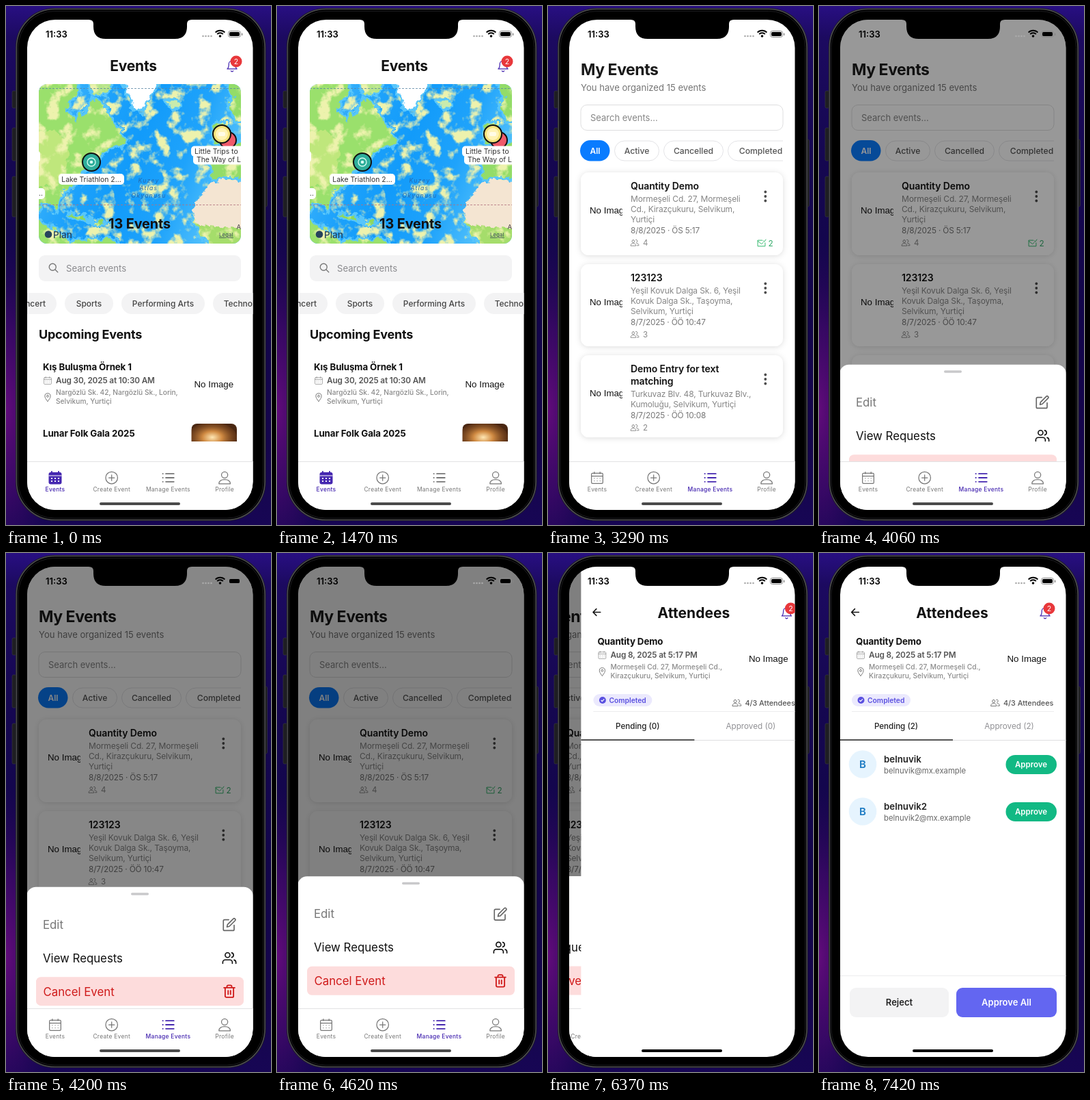
An HTML page that plays this animation: 388 by 758 pixels, repeating every 8000 ms.

```html
<!DOCTYPE html>
<html lang="en">
<head>
<meta charset="utf-8">
<title>Events app</title>
<style>
html, body { margin: 0; width: 100%; height: 100%; overflow: hidden; background: #140752; }
svg { display: block; width: 100%; height: 100%; }
text { font-family: Inter, "Noto Sans", sans-serif; white-space: pre; }
.plain { font-family: "Liberation Sans", Arial, sans-serif; }
.shore { stroke: #58c6fb; stroke-width: 7; paint-order: stroke; }
</style>
</head>
<body>
<svg id="stage" viewBox="0 0 388 758"></svg>
<script>
const LOOP = 8000, STEP = 70, SCREEN_W = 332, SHEET_H = 264;
const INDIGO = '#4527b0', GREY = '#777';

const text = (x, y, size, str, o = {}) =>
  `<text x="${x}" y="${y}" font-size="${size}" font-weight="${o.w || 400}" fill="${o.c || '#111'}"` +
  ` text-anchor="${o.a || 'start'}" letter-spacing="${o.ls || 0}" ${o.x || ''}>${str}</text>`;
const mid = (x, y, size, str, o = {}) => text(x, y, size, str, { ...o, a: 'middle' });
const rect = (x, y, w, h, r, fill, extra = '') =>
  `<rect x="${x}" y="${y}" width="${w}" height="${h}" rx="${r}" fill="${fill}" ${extra}/>`;
const circle = (x, y, r, fill, extra = '') =>
  `<circle cx="${x}" cy="${y}" r="${r}" fill="${fill}" ${extra}/>`;
const line = (x1, x2, y, color, extra = '') =>
  `<path d="M${x1} ${y}H${x2}" stroke="${color}" ${extra}/>`;

// Icons live in a 24 x 24 box.
const ICONS = {
  calendar: 'M4 4h16a2 2 0 0 1 2 2v14a2 2 0 0 1-2 2H4a2 2 0 0 1-2-2V6a2 2 0 0 1 2-2zM2 9h20M7 2v3M17 2v3M7 13h.1M12 13h.1M17 13h.1M7 17.5h.1M12 17.5h.1M17 17.5h.1',
  plus: 'M12 1.5a10.5 10.5 0 1 0 0 21 10.5 10.5 0 0 0 0-21M12 7v10M7 12h10',
  list: 'M8 5h14M8 12h14M8 19h14M2.5 5h.4M2.5 12h.4M2.5 19h.4',
  person: 'M12 1.5a5.5 5.5 0 1 0 0 11 5.5 5.5 0 0 0 0-11M2 22.5c0-5 4.5-7.5 10-7.5s10 2.5 10 7.5z',
  pin: 'M12 22s7-7 7-13a7 7 0 0 0-14 0c0 6 7 13 7 13zM12 6.5a2.5 2.5 0 1 0 0 5 2.5 2.5 0 0 0 0-5',
  bell: 'M18 8a6 6 0 0 0-12 0c0 7-3 9-3 9h18s-3-2-3-9M14 20.5a2.2 2.2 0 0 1-4 0',
  edit: 'M11 4H4a2 2 0 0 0-2 2v14a2 2 0 0 0 2 2h14a2 2 0 0 0 2-2v-7M18.5 2.5a2.12 2.12 0 0 1 3 3L12 15l-4 1 1-4z',
  users: 'M17 21v-2a4 4 0 0 0-4-4H5a4 4 0 0 0-4 4v2M23 21v-2a4 4 0 0 0-3-3.87M16 3.13a4 4 0 0 1 0 7.75M9 3a4 4 0 1 0 0 8 4 4 0 0 0 0-8',
  trash: 'M3 6h18M19 6v14a2 2 0 0 1-2 2H7a2 2 0 0 1-2-2V6M8 6V4a2 2 0 0 1 2-2h4a2 2 0 0 1 2 2v2M10 11v6M14 11v6',
  group: 'M8 5a3.5 3.5 0 1 0 0 7 3.5 3.5 0 0 0 0-7M1 20c0-4 3-6 7-6s7 2 7 6zM15 4.5a3.5 3.5 0 1 1 1.5 7M17 14c4 0 6 2 6 6h-5',
  mail: 'M14 4H2v16h20V11M2 6l10 8 5-4M17 5l2.5 3L24 2',
  search: 'M10 2a8 8 0 1 0 0 16 8 8 0 0 0 0-16M16 16l6 6',
  back: 'M22 12H3M11 3l-9 9 9 9'
};
const icon = (name, x, y, size, color, width = 1.6) =>
  `<path d="${ICONS[name]}" transform="translate(${x - size / 2} ${y - size / 2}) scale(${size / 24})" fill="none"` +
  ` stroke="${color}" stroke-width="${width}" stroke-linecap="round" stroke-linejoin="round"/>`;

const noImage = (x, y) => text(x, y, 13.3, 'No Image', { x: 'class="plain"' });

const bell = () => icon('bell', 331, 88, 19, INDIGO, 1.6) + circle(337, 81, 8.5, '#e8383b') +
  mid(337, 85, 10.5, '2', { c: '#fff' });

function tabBar(active) {
  const tabs = [['calendar', 'Events'], ['plus', 'Create Event'], ['list', 'Manage Events'], ['person', 'Profile']];
  return rect(30, 665, 332, 74, 0, '#fff') + line(30, 362, 665.5, '#e2e2e4') + tabs.map(([name, label], i) => {
    const x = 72 + i * 82.7, color = i === active ? INDIGO : GREY;
    const full = i === active && name === 'calendar';
    const mark = full
      ? rect(x - 9.5, 681, 19, 17.5, 3, color) + rect(x - 6, 679, 2, 4, 1, color) + rect(x + 4, 679, 2, 4, 1, color) +
        line(x - 9.5, x + 9.5, 686, '#fff') +
        [0, 1, 2, 3, 4, 5].map(k => rect(x - 6 + (k % 3) * 5, k < 3 ? 689 : 693, 2, 2, .4, '#fff')).join('')
      : icon(name, x, 689, 20, color, name === 'list' ? 2.2 : 1.5);
    return mark + mid(x, 709, 8.5, label, { c: color, ls: .25, w: i === active ? 500 : 400 });
  }).join('');
}

function eventInfo(dy, title, date, street, city) {
  return `<g transform="translate(0 ${dy})">` +
    text(54, 134, 13.3, title, { w: 700, ls: -.1 }) +
    icon('calendar', 61, 149, 13, '#888', 1.3) +
    text(73, 153, 11.8, date, { w: 600, c: '#555', ls: -.15 }) +
    icon('pin', 61, 173.5, 14, '#777', 1.7) +
    text(73, 170, 10.2, street, { w: 500, c: '#8a8a8a' }) +
    text(73, 182.5, 10.2, city, { w: 500, c: '#8a8a8a' }) +
    noImage(275.5, 159) + '</g>';
}

function map() {
  const tag = (x, y, w, str) => rect(x, y, w, 15.5, 5, '#fff') + text(x + 5, y + 11.5, 10.4, str, { c: '#333' });
  const sea = (y, str) => mid(209, y, 8.5, str, { c: '#2468ae', ls: 1.3, x: 'font-style="italic"' });
  return `<g clip-path="url(#mapClip)">` + rect(48, 114, 296, 233, 0, 'url(#ocean)') +
    `<g filter="url(#land)">
      <path class="shore" d="M40 106H104L106 128 90 142 86 154 98 160 104 172 110 158 122 150 126 134 142 144 152 162 168 182 174 202 152 206 140 219 126 228 112 240 102 254 95 264 84 272 77 284 74 300 64 288 50 288 46 310 62 322 76 328 92 345 150 338 176 355H40Z" fill="#9ae06c"/>
      <path class="shore" d="M112 106H156L148 130 128 126Z" fill="#b5e58a"/>
      <path d="M40 190L70 180 92 200 88 240 70 262 40 270Z" fill="#bfe77c"/>
      <path class="shore" d="M86 302L112 306 122 314 104 312Z M128 314L144 317 134 321Z" fill="#8fd85c"/>
      <path class="shore" d="M318 106H352V170L336 164 326 150 334 130Z M306 176L318 168 326 190 318 204 304 198Z M318 212L352 194V256L330 246 304 252 300 230 322 228Z" fill="#93dc68"/>
      <path class="shore" d="M274 309L300 317 352 320V355H306L286 338Z" fill="#a5dd6b"/>
    </g><g filter="url(#rough)">
      <path class="shore" d="M172 106H224L212 130 196 153 186 146 178 124Z" fill="#fff"/>
      <path class="shore" d="M236 140L252 137 256 145 242 150Z" fill="#c9ebad"/>
      <path d="M302 258L320 252 352 256V325L284 320 272 306 276 288 290 272Z" fill="#f4e5d2"/>
    </g>` +
    line(48, 344, 120.5, '#5a86a4', 'stroke-dasharray="3 2" stroke-width=".8"') +
    line(48, 344, 290.5, '#b2707e', 'stroke-dasharray="3 2" stroke-width=".8"') +
    sea(258, 'Kuzey') + sea(268.5, 'Atlas') + sea(279.5, 'Okyanusu') +
    circle(325, 196, 12, '#ef5a6a', 'stroke="#111" stroke-width="2"') +
    circle(316, 187, 13, '#f5e27a', 'stroke="#111" stroke-width="2"') +
    circle(316, 187, 9, '#fff3b4') + rect(311, 184, 10, 6, 2, '#fffbe6') +
    tag(274, 216, 90, 'The Way of Lu') + tag(271, 204.5, 90, 'Little Trips to') +
    circle(125, 228, 13, '#2fae9b', 'stroke="#111" stroke-width="2"') +
    circle(125, 228, 6, 'none', 'stroke="#d9fff4" stroke-width="1.3"') + circle(125, 228, 2.3, '#d9fff4') +
    rect(77, 245, 96, 16, 5, '#fff') + mid(125, 256.8, 10.4, 'Lake Triathlon 2...', { c: '#333' }) +
    rect(40, 266, 17, 16, 5, '#fff') + text(48, 277, 10, '..', { c: '#333' }) + rect(40, 212, 10, 16, 4, '#fff') +
    mid(195.5, 325, 19.8, '13 Events', { w: 700, ls: -.1 }) +
    circle(62, 333.5, 5.3, '#26435c') + text(69, 338.5, 13.5, 'Plan', { c: '#26435c', w: 500 }) +
    text(312, 337, 7.5, 'Legal', { c: '#345', ls: .3, x: 'text-decoration="underline"' }) +
    text(337.5, 326, 9.5, 'A', { c: '#444' }) + '</g>';
}

function eventsScreen() {
  const chip = (x, w, label) => rect(x, 419, w, 31, 15.5, '#f3f3f4') +
    mid(x + w / 2, 439, 11.9, label, { w: 500, c: '#444' });
  return rect(30, 19, 332, 720, 0, '#fff') + mid(186.5, 95, 21, 'Events', { w: 700, ls: -.2 }) + bell() + map() +
    rect(48, 364, 296, 38, 9, '#f3f3f4') + icon('search', 69.5, 382.5, 15, '#777', 2.2) +
    text(88, 387.5, 13.1, 'Search events', { c: '#8a8a8e' }) +
    chip(0, 74, '') + text(58, 439, 11.9, 'Concert', { w: 500, c: '#444', a: 'end' }) +
    chip(86, 71, 'Sports') + chip(169, 122, 'Performing Arts') + chip(303, 98, 'Technology') +
    text(48, 486, 18, 'Upcoming Events', { w: 700, ls: -.2 }) +
    eventInfo(398, 'Kış Buluşma Örnek 1', 'Aug 30, 2025 at 10:30 AM', 'Nargözlü Sk. 42, Nargözlü Sk., Lorin,', 'Selvikum, Yurtiçi') +
    text(54, 629, 13.3, 'Lunar Folk Gala 2025', { w: 700, ls: -.1 }) +
    `<g clip-path="url(#thumbClip)">` + rect(271.5, 610, 66.5, 60, 8, '#4a2712') +
    `<ellipse cx="302" cy="630" rx="36" ry="22" fill="url(#glow)"/></g>` + tabBar(0);
}

function card(y, h, title, address, date, count) {
  const rows = title.length > 1 ? 18 : 0, base = y + 25;
  const first = base + rows + 18, dateY = first + address.length * 15;
  return rect(48, y, 296, h, 12, '#fff', 'filter="url(#shadow)"') +
    `<g clip-path="url(#picClip)">${noImage(61, y + 60)}</g>` +
    title.map((s, i) => text(121, base + i * 18, 14, s, { w: 600, ls: -.1 })).join('') +
    address.map((s, i) => text(121, first + i * 15.2, 12, s, { c: '#868686', ls: -.15 })).join('') +
    text(121, dateY + .5, 11.8, date, { c: '#747474', ls: -.15 }) +
    icon('group', 127, dateY + 14.5, 13, '#777', 1.5) + text(139, dateY + 19, 11.5, count, { c: '#888' }) +
    `<g ${y < 300 ? 'id="dots"' : ''}>` + [28.5, 35, 41.5].map(d => circle(318.3, y + d, 1.9, '#4c4c4c')).join('') + '</g>';
}

function manageScreen() {
  const chip = (x, w, label) => rect(x, 197, w, 29, 14.5, '#fff', 'stroke="#e3e3e6"') +
    mid(x + w / 2, 216, 12.2, label, { w: 500, c: '#555' });
  return rect(30, 19, 332, 720, 0, '#fff') + text(48, 101, 23, 'My Events', { w: 700, ls: -.45, c: '#1a1a1a' }) +
    text(48, 123.5, 13.1, 'You have organized 15 events', { c: '#757575' }) +
    rect(48, 144.5, 296, 37, 9, '#fff', 'stroke="#dededf"') + text(62, 168, 13, 'Search events...', { c: '#868686' }) +
    `<g clip-path="url(#chipClip)">` + rect(47, 196, 43.5, 30.5, 15.2, '#0a7cff') +
    mid(69, 216, 12, 'All', { w: 600, c: '#fff' }) +
    chip(97.5, 65, 'Active') + chip(169.5, 87, 'Cancelled') + chip(263.5, 96, 'Completed') + '</g>' +
    card(243, 121, ['Quantity Demo'], ['Mormeşeli Cd. 27, Mormeşeli', 'Cd., Kirazçukuru, Selvikum,', 'Yurtiçi'], '8/8/2025 · ÖS 5:17', '4') +
    icon('mail', 312.5, 346.5, 13, '#2fb86a', 1.8) + text(322.5, 351, 11.8, '2', { c: '#2fa866' }) +
    card(377, 120, ['123123'], ['Yeşil Kovuk Dalga Sk. 6, Yeşil', 'Kovuk Dalga Sk., Taşoyma,', 'Selvikum, Yurtiçi'], '8/7/2025 · ÖÖ 10:47', '3') +
    card(510, 120, ['Demo Entry for text', 'matching'], ['Turkuvaz Blv. 48, Turkuvaz Blv.,', 'Kumoluğu, Selvikum, Yurtiçi'], '8/7/2025 · ÖÖ 10:08', '2') +
    rect(30, 19, 332, 720, 0, '#000', 'id="dim"') +
    `<g id="sheet">` + rect(30, 472, 332, 330, 14, '#fff') + rect(183, 480.5, 26, 3.5, 1.7, '#c9c9cb') +
    text(54, 533, 16.8, 'Edit', { c: '#777' }) + icon('edit', 327, 527, 21, '#666', 1.9) +
    `<g id="requests">` + text(54, 582, 16.8, 'View Requests') + icon('users', 327, 576, 21, '#111', 1.9) + '</g>' +
    rect(44, 603.5, 304, 42, 7, '#fddcdc') + text(54.5, 631, 16.8, 'Cancel Event', { c: '#cf1a1a' }) +
    icon('trash', 327, 624.5, 21, '#cf1a1a', 2.1) + '</g>' + tabBar(2);
}

function person(y, name) {
  return circle(64, y, 20.3, '#e6f4fe') + mid(64, y + 5.5, 15, 'B', { w: 600, c: '#1b7ac2' }) +
    text(95, y - 3, 13.3, name, { w: 600, c: '#222' }) + text(95, y + 13.5, 11.3, name + '@mx.example', { c: '#666' }) +
    rect(273.5, y - 13.5, 74.5, 28, 14, '#12b984') + mid(310.5, y + 4.5, 11.5, 'Approve', { w: 600, c: '#fff' });
}

function attendeesScreen() {
  return rect(30, 19, 332, 720, 0, '#fff') + icon('back', 53, 86.5, 13, '#111', 2.8) +
    mid(195, 95, 21, 'Attendees', { w: 700 }) + bell() +
    eventInfo(0, 'Quantity Demo', 'Aug 8, 2025 at 5:17 PM', 'Mormeşeli Cd. 27, Mormeşeli Cd.,', 'Kirazçukuru, Selvikum, Yurtiçi') +
    rect(48, 206, 86, 18, 9, '#ebe9fd') + circle(61.5, 215, 5, '#5a50e0') +
    '<path d="M59.3 215l1.6 1.7 3-3.3" fill="none" stroke="#fff" stroke-width="1.2"/>' +
    text(71, 218.8, 10.3, 'Completed', { w: 600, c: '#5a50e0' }) +
    icon('group', 258, 218.5, 14, '#666', 1.5) + text(270, 222.5, 10.8, '4/3 Attendees', { w: 500, c: '#555' }) +
    line(48, 344, 231.5, '#ececee') +
    mid(113, 257, 11.6, 'Pending (0)', { w: 500, c: '#222', x: 'id="pending"' }) +
    mid(278.5, 257, 11.7, 'Approved (0)', { c: '#909094', x: 'id="approved"' }) +
    line(30, 362, 273.5, '#dedee0') + line(30, 196, 273, '#222', 'stroke-width="1.5"') +
    `<g id="people">` + person(308.5, 'belnuvik') + person(377.5, 'belnuvik2') +
    line(30, 362, 617.5, '#ececee') + rect(45, 635, 145, 43, 9, '#f3f3f4') +
    mid(117.5, 661, 13, 'Reject', { w: 600, c: '#222' }) +
    rect(201, 635, 147, 43, 9, '#6366f1') + mid(274.5, 661, 13, 'Approve All', { w: 600, c: '#fff' }) + '</g>';
}

function phoneBody() {
  const button = (x, y, h) => rect(x, y, 6, h, 2, '#1e1e22', 'stroke="#3a3a40" stroke-width=".6"');
  return rect(0, 0, 388, 758, 0, 'url(#wall)') + rect(0, 0, 388, 758, 0, 'url(#magenta)') +
    button(9, 124, 25) + button(9, 178, 48) + button(9, 249, 59) + button(376.5, 195, 98) +
    rect(14, 3, 366.5, 749, 57, '#1c1c1f') +
    rect(15.5, 4.5, 363.5, 746, 56, '#000', 'stroke="#4c4c50" stroke-width="1.6"') +
    rect(18, 7.5, 358.5, 740.5, 53, '#000', 'stroke="#1d1d20"');
}

function statusBar() {
  const arc = r => `<path d="M${313.5 - r * .72} ${45.5 - r * .72}A${r} ${r} 0 0 1 ${313.5 + r * .72} ${45.5 - r * .72}" fill="none" stroke="#000" stroke-width="2"/>`;
  return text(58, 45.5, 13, '11:33', { w: 600, c: '#000' }) +
    [0, 1, 2, 3].map(i => circle(288.5 + i * 4, 44, 1.3, '#aaa')).join('') +
    arc(9.5) + arc(6) + circle(313.5, 44, 1.8, '#000') +
    rect(325.5, 36.5, 18, 9, 3, 'none', 'stroke="#888"') + rect(327, 38, 15, 6, 1.7, '#000') + rect(345, 39.5, 1.3, 3.5, .6, '#888') +
    '<path d="M121 18V20Q128 20 128 26V30Q128 48 146 48H247Q265 48 265 30V26Q265 20 272 20V18Z" fill="#000"/>';
}

const clip = (id, shape) => `<clipPath id="${id}">${shape}</clipPath>`;
const stops = list => list.map(([o, c, a = 1]) => `<stop offset="${o}" stop-color="${c}" stop-opacity="${a}"/>`).join('');
const area = 'filterUnits="userSpaceOnUse" x="30" y="100" width="330" height="260"';
const displace = `<feTurbulence type="fractalNoise" baseFrequency=".09" numOctaves="3" seed="4" result="noise"/>
  <feDisplacementMap in="SourceGraphic" in2="noise" scale="16" xChannelSelector="R" yChannelSelector="G" result="ground"/>`;

document.getElementById('stage').innerHTML = `<defs>
  <linearGradient id="wall" x2="0" y2="1">${stops([[0, '#280f82'], [.06, '#1c0a60'], [.3, '#150750'], [.6, '#12054a'], [.85, '#15054c'], [1, '#170654']])}</linearGradient>
  <radialGradient id="magenta" gradientUnits="userSpaceOnUse" cx="0" cy="0" r="1" gradientTransform="translate(0 590) scale(75 250)">${stops([[0, '#6a0c80', .9], [.5, '#4c0a72', .6], [1, '#300860', 0]])}</radialGradient>
  <linearGradient id="ocean" x2="1" y2=".3">${stops([[0, '#4cbcfb'], [.35, '#1da2fb'], [.55, '#129bfa'], [.8, '#1fa3fb'], [1, '#4cbdfb']])}</linearGradient>
  <radialGradient id="glow">${stops([[0, '#ffe7b4'], [.4, '#d08a42'], [1, '#6b3a18', .5]])}</radialGradient>
  <filter id="rough" ${area}>${displace}</filter>
  <filter id="land" ${area} color-interpolation-filters="sRGB">${displace}
    <feTurbulence type="fractalNoise" baseFrequency=".05" numOctaves="4" seed="9"/>
    <feColorMatrix values="0 0 0 0 .93  0 0 0 0 .95  0 0 0 0 .68  5 0 0 0 -2.5" result="pale"/>
    <feColorMatrix in="ground" values="1 0 0 0 0  0 1 0 0 0  0 0 1 0 0  0 0 -6 1 4" result="soil"/>
    <feComposite in="pale" in2="soil" operator="in" result="patches"/>
    <feMerge><feMergeNode in="ground"/><feMergeNode in="patches"/></feMerge>
  </filter>
  <filter id="shadow" x="-10%" y="-20%" width="120%" height="140%"><feDropShadow dx="0" dy="1" stdDeviation="4.5" flood-color="#000" flood-opacity=".14"/></filter>
  ${clip('screenClip', rect(31, 20, 330.5, 716, 41, '#000'))}
  ${clip('mapClip', rect(48, 114, 296, 233, 12, '#000'))}
  ${clip('thumbClip', rect(271.5, 610, 66.5, 26, 0, '#000'))}
  ${clip('chipClip', rect(30, 190, 314, 44, 0, '#000'))}
  ${clip('picClip', rect(55, 230, 54, 430, 0, '#000'))}
</defs>${phoneBody()}<g clip-path="url(#screenClip)">
  <g id="events">${eventsScreen()}</g>
  <g id="manage">${manageScreen()}</g>
  <g id="attendees">${attendeesScreen()}</g>
  ${statusBar()}${rect(137, 725, 118, 4, 2, '#000', 'id="home"')}
</g>`;

const ui = Object.fromEntries(['events', 'manage', 'attendees', 'dots', 'dim', 'sheet', 'requests', 'pending', 'approved', 'people', 'home']
  .map(id => [id, document.getElementById(id)]));
const show = (node, on) => node.setAttribute('display', on ? 'inline' : 'none');
const moveTo = (node, x, y) => node.setAttribute('transform', `translate(${x.toFixed(2)} ${y.toFixed(2)})`);

// Critically damped spring from 0 to 1.
function spring(ms, rate) {
  const k = Math.max(0, ms) / 1000 * rate;
  return 1 - (1 + k) * Math.exp(-k);
}

function draw(time) {
  const t = Math.floor(time / STEP) * STEP;
  const open = spring(t - 3780, 10.8);
  const push = spring(t - 6040, 14);
  const loaded = t >= 7350;

  show(ui.events, t < 2170);
  show(ui.manage, t >= 2170 && t < 6720);
  show(ui.attendees, push > 0);
  moveTo(ui.manage, -.3 * SCREEN_W * push, 0);
  moveTo(ui.attendees, SCREEN_W * (1 - push), 0);

  ui.dots.setAttribute('opacity', t >= 3710 && t < 3850 ? .25 : 1);
  ui.dim.setAttribute('opacity', .5 * open);
  moveTo(ui.sheet, 0, SHEET_H * (1 - open));
  ui.requests.setAttribute('opacity', t >= 6020 && t < 6090 ? .22 : 1);

  const count = loaded ? 2 : 0;
  ui.pending.textContent = `Pending (${count})`;
  ui.approved.textContent = `Approved (${count})`;
  show(ui.people, loaded);
  ui.home.setAttribute('fill', push > 0 ? '#000' : '#4a4a4a');
}

const start = performance.now();
function tick() {
  draw((performance.now() - start) % LOOP);
  requestAnimationFrame(tick);
}
tick();
</script>
</body>
</html>
```
